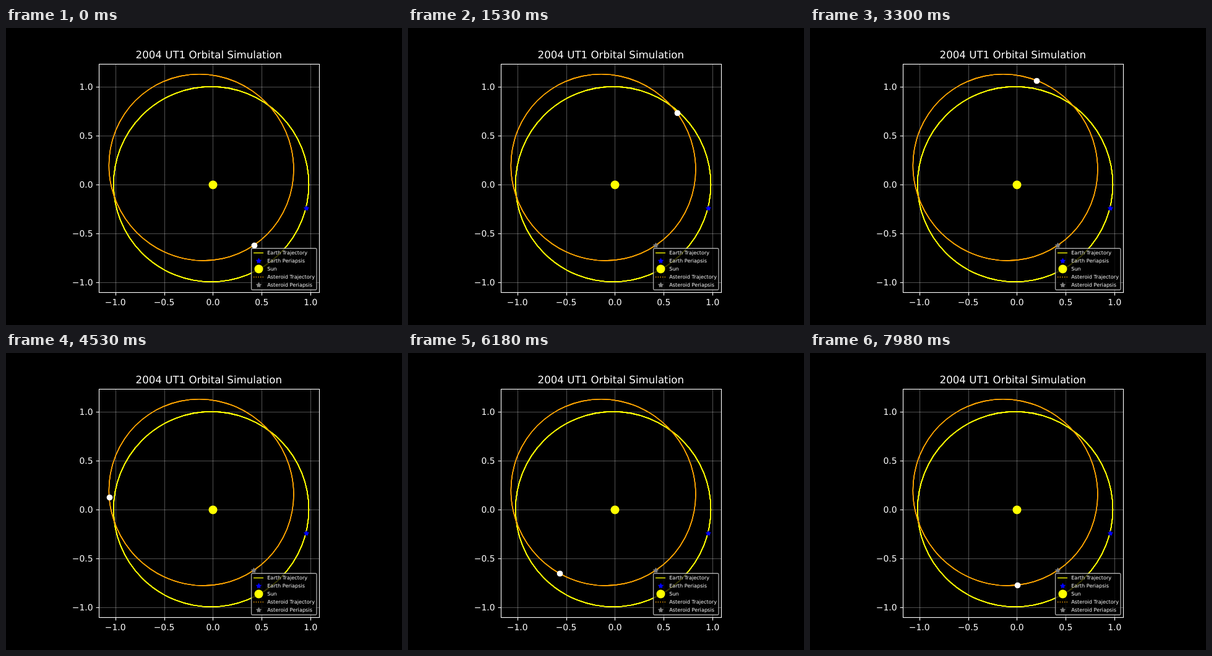
Animation of 640x480 px, one loop 8000 ms. Source, as an HTML page:

```html
<!DOCTYPE html>
<html lang="en">
<head>
<meta charset="utf-8">
<title>Orbital Simulation</title>
<style>
  html, body { margin: 0; width: 100%; height: 100%; overflow: hidden; background: #000; }
  svg { display: block; width: 640px; height: 480px; }
  text { font-family: "DejaVu Sans", sans-serif; fill: #fff; text-rendering: geometricPrecision; }
</style>
</head>
<body>
<svg id="stage" viewBox="0 0 640 480"></svg>
<script>
const LOOP = 8000, STEP = 30;
const SCALE = 157.8, SUN = { x: 334.45, y: 253.2 };
const PT = 100 / 72;
const BOX = { left: 150.5, right: 506.5, top: 58.5, bottom: 427.5 };

const orbit = {
  x: 315.65, y: 225.3, a: 151.8, b: 148.1, e: 0.219,
  tilt: 56 * Math.PI / 180,
  stepAngle: 5.4947 * Math.PI / 180
};

const stage = document.getElementById('stage');

function add(tag, attrs, text) {
  const node = document.createElementNS(stage.namespaceURI, tag);
  for (const name in attrs) node.setAttribute(name, attrs[name]);
  if (text) node.textContent = text;
  return stage.appendChild(node);
}
const line = (x1, y1, x2, y2, stroke, width, extra) =>
  add('line', { x1, y1, x2, y2, stroke, 'stroke-width': width, ...extra });
const label = (x, y, size, text, anchor = 'start') =>
  add('text', { x, y, 'font-size': size, 'text-anchor': anchor }, text);
const disc = (cx, cy, r, fill) => add('circle', { cx, cy, r, fill });
const snap = v => Math.floor(v + 0.5) + 0.5;

// Five-pointed star with its corners on whole pixels
function star(cx, cy, color) {
  const points = Array.from({ length: 10 }, (_, i) => {
    const r = 3 * PT * (i % 2 ? 0.382 : 1), angle = i * Math.PI / 5;
    return [cx + Math.round(r * Math.sin(angle)), cy - Math.round(r * Math.cos(angle))];
  });
  add('polygon', { points: points.join(' '), fill: color, stroke: color,
    'stroke-width': PT, 'stroke-linejoin': 'bevel' });
}

// Repeated revolutions harden the antialiased edge of the line
function trajectory(x, y, rx, ry, angle, stroke, revolutions) {
  for (let i = 0; i < revolutions; i++)
    add('ellipse', { rx, ry, fill: 'none', stroke, 'stroke-width': PT,
      transform: `translate(${x} ${y}) rotate(${angle})` });
}

// Grid, ticks and tick labels
const ticks = [-1, -0.5, 0, 0.5, 1];
const format = v => v.toFixed(1).replace('-', '\u2212');
const hair = 0.8 * PT, tickLength = 3.5 * PT;
for (const v of ticks) {
  const x = snap(SUN.x + v * SCALE), y = snap(SUN.y - v * SCALE);
  line(x, BOX.top, x, BOX.bottom, '#fff', hair, { opacity: 0.3 });
  line(BOX.left, y, BOX.right, y, '#fff', hair, { opacity: 0.3 });
  line(x, BOX.bottom, x, BOX.bottom + tickLength, '#fff', hair);
  line(BOX.left - tickLength, y, BOX.left, y, '#fff', hair);
  label(SUN.x + v * SCALE, 448, 10 * PT, format(v), 'middle');
  label(140.5, Math.floor(SUN.y - v * SCALE + 5.2), 10 * PT, format(v), 'end');
}

trajectory(331.6, 252.5, SCALE, SCALE, 0, '#ff0', 6);
trajectory(orbit.x, orbit.y, orbit.a, orbit.b, 56, '#ffa500', 3);

star(485.5, 291.5, '#00f');
disc(334.5, 253.5, 7, '#ff0');
star(400.5, 351.5, '#808080');
const asteroid = disc(0, 0, 3.5 * PT, '#fff');

add('rect', { x: BOX.left, y: BOX.top, width: BOX.right - BOX.left, height: BOX.bottom - BOX.top,
  fill: 'none', stroke: '#fff', 'stroke-width': hair });
label(327.8, 49, 12 * PT, '2004 UT1 Orbital Simulation', 'middle');

// Legend
add('rect', { x: 396.6, y: 356.2, width: 105.4, height: 67, rx: 1.6, fill: '#000', 'fill-opacity': 0.8,
  stroke: '#ccc', 'stroke-opacity': 0.8, 'stroke-width': PT });
const legend = [
  ['Earth Trajectory', y => line(400, y, 416, y, '#ff0', PT)],
  ['Earth Periapsis', y => star(408.5, y, '#00f')],
  ['Sun', y => disc(408.5, y, 7, '#ff0')],
  ['Asteroid Trajectory', y => line(400, y, 416, y, '#ffa500', PT,
    { 'stroke-dasharray': `${PT} ${1.65 * PT}` })],
  ['Asteroid Periapsis', y => star(408.5, y, '#808080')]
];
legend.forEach(([text, drawHandle], i) => {
  const y = 363.5 + 13 * i;
  drawHandle(y);
  label(422.2, y + 2.5, 8.2, text);
});

// Kepler's equation, solved by Newton's method
function eccentricAnomaly(mean, e) {
  let E = mean;
  for (let i = 0; i < 6; i++) E -= (E - e * Math.sin(E) - mean) / (1 - e * Math.cos(E));
  return E;
}

function render(time) {
  const step = Math.floor((time % LOOP) / STEP);
  const E = eccentricAnomaly(step * orbit.stepAngle, orbit.e);
  const along = orbit.a * Math.cos(E), across = orbit.b * Math.sin(E);
  const cos = Math.cos(orbit.tilt), sin = Math.sin(orbit.tilt);
  asteroid.setAttribute('cx', snap(orbit.x + along * cos - across * sin));
  asteroid.setAttribute('cy', snap(orbit.y + along * sin + across * cos));
}

const start = performance.now();
function tick() {
  render(performance.now() - start);
  requestAnimationFrame(tick);
}
tick();
</script>
</body>
</html>
```
